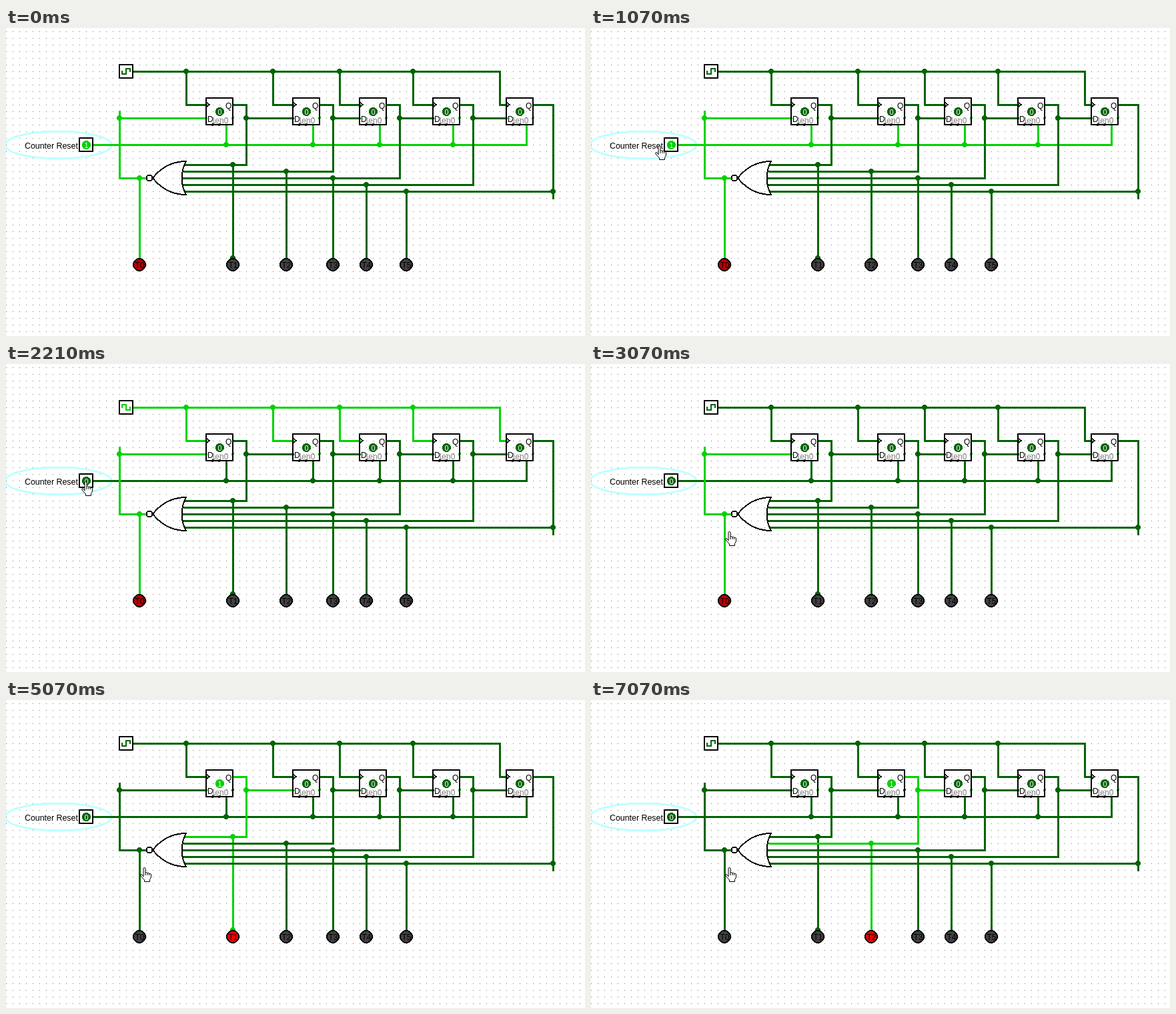
Animation of 868x462 px, one loop 8000 ms. Source, as an HTML page:

```html
<!DOCTYPE html>
<html lang="en">
<head>
<meta charset="utf-8">
<title>Ring counter</title>
<style>
  html, body { margin: 0; width: 100%; height: 100%; overflow: hidden; background: #fff; }
  svg { display: block; }
  text { font: 12px "Liberation Sans", Arial, sans-serif; }
</style>
</head>
<body>
<svg id="stage" width="868" height="462" viewBox="0 0 868 462" shape-rendering="crispEdges"></svg>
<script>
const LOOP = 8000, STEP = 70;
const ON = '#00d200', OFF = '#006400';
const stage = document.getElementById('stage');

function add(tag, attrs, parent = stage, content) {
  const el = document.createElementNS('http://www.w3.org/2000/svg', tag);
  for (const key in attrs) el.setAttribute(key, attrs[key]);
  if (content !== undefined) el.textContent = content;
  parent.append(el);
  return el;
}
const label = (x, y, content, attrs = {}) => add('text', { x, y, ...attrs }, stage, content);
const outline = (tag, attrs) => add(tag, { fill: 'none', stroke: '#000', 'stroke-width': 2, ...attrs });
const level = on => on ? ON : OFF;

// Wires and their junctions share one colour per net.
function net(d, junctions) {
  const g = add('g', {});
  add('path', { d, fill: 'none', stroke: 'currentColor', 'stroke-width': 3,
    'stroke-linecap': 'square', transform: 'translate(.5 .5)' }, g);
  for (const [cx, cy] of junctions) add('circle', { cx, cy, r: 4, fill: 'currentColor' }, g);
  return g;
}

function valueDot(cx, cy) {
  const dot = add('circle', { cx, cy, r: 6.5 });
  const digit = label(cx, cy + 4, '0', { fill: '#fff', 'text-anchor': 'middle', 'font-weight': 'bold' });
  digit.style.fontSize = '11px';
  return on => {
    dot.setAttribute('fill', level(on));
    digit.textContent = on ? '1' : '0';
  };
}

// Background grid
const pattern = add('pattern', { id: 'grid', width: 10, height: 10, patternUnits: 'userSpaceOnUse' }, add('defs', {}));
add('rect', { x: 0, y: 5, width: 1, height: 1, fill: '#777' }, pattern);
add('rect', { width: 868, height: 462, fill: 'url(#grid)' });
outline('ellipse', { cx: 78.5, cy: 175.5, rx: 79.5, ry: 20.5, stroke: '#c0ffff', 'stroke-width': 3 });

// Wiring
const flops = [300, 430, 530, 640, 750];
const taps = [340, 420, 490, 540, 600];
const drops = [270, 400, 500, 610];

const clockNet = net('M190 65H740V115H750' + drops.map((x, i) => `M${x} 65V115H${flops[i]}`).join(''),
  drops.map(x => [x, 65]));
const resetNet = net('M130 175H780V145' + flops.slice(0, 4).map(x => `M${x + 30} 175V145`).join(''),
  flops.slice(0, 4).map(x => [x + 30, 175]));
const norNet = net('M170 125V225H210M170 135H300M200 225V345', [[170, 135], [200, 225]]);

const outNets = flops.map((x, i) => {
  const y = 205 + 10 * i, last = i === 4;
  const bus = x + (last ? 70 : 60);
  const gateX = 266 + 4 * ((y - 225) / 25) ** 2;
  const joints = [[bus, last ? y : 135], [taps[i], y]];
  if (i === 0) joints.push([taps[0], 345]);
  const branch = last ? `M${bus} ${y}V255` : `M${bus} 135H${flops[i + 1]}`;
  return net(`M${x + 40} 115H${bus}V${y}H${gateX}${branch}M${taps[i]} ${y}V345`, joints);
});

// Clock source, reset pin and gate
outline('rect', { x: 170, y: 55, width: 20, height: 20 });
const wave = outline('path', {});
label(28, 181, 'Counter Reset').style.fontSize = '12.4px';
outline('rect', { x: 110, y: 165, width: 20, height: 20 });
const setPin = valueDot(120.5, 175.5);
outline('path', { d: 'M220 225Q240 200 270 200Q257 225 270 250Q240 250 220 225Z' });
outline('circle', { cx: 215, cy: 225, r: 4.5 });

// Flip-flops
const setFlop = flops.map(x => {
  for (const dx of [10, 20]) add('circle', { cx: x + dx, cy: 145, r: 2, fill: '#2828ff' });
  const inverse = add('circle', { cx: x + 40, cy: 135, r: 2 });
  outline('rect', { x, y: 105, width: 40, height: 40 });
  outline('path', { d: `M${x} 111l5 4l-5 4`, 'stroke-width': 1.5 });
  label(x + 2, 141, 'D');
  label(x + 29, 121, 'Q');
  [['1', 11], ['en', 20], ['0', 30]].forEach(([name, dx]) =>
    label(x + dx, 143, name, { fill: '#808080', 'text-anchor': 'middle' }));
  const setDot = valueDot(x + 20.5, 125.5);
  return on => {
    setDot(on);
    inverse.setAttribute('fill', level(!on));
  };
});

// Lamps
const lamps = [200, ...taps].map((cx, i) => {
  const lamp = outline('circle', { cx, cy: 355, r: 9 });
  label(cx + .5, 360, 'T' + i, { 'text-anchor': 'middle' });
  return on => lamp.setAttribute('fill', on ? (i ? '#f00000' : '#b80000') : '#404040');
});

// Hand pointer
const hand = add('g', { 'shape-rendering': 'auto' });
add('path', { d: 'M5 14V2Q5 .5 6.5 .5T8 2V8Q9.5 6.8 11 8.5Q12.7 7.6 13.7 9.3Q16.5 8.6 16.5 11V15L14.5 18.5V21.5H6.5V19L1 13Q0 10.5 2.5 10.5Z',
  fill: '#fff', stroke: '#000' }, hand);
add('path', { d: 'M8 8V12M11 8.5V12M13.7 9.3V12', fill: 'none', stroke: '#000' }, hand);

// [start, end, from, to]: position advances once per STEP
const moves = [
  [310, 870, [740, 438], [87, 184], p => 1 - (1 - p) ** 1.5],
  [1010, 1070, [91, 180], [96, 176]],
  [1070, 1280, [96, 176], [109, 176]],
  [1680, 1680, [113, 176], [113, 176]],
  [2600, 2740, [142, 201], [201, 251]]
];

function pointerAt(t) {
  const move = moves.filter(m => t >= m[0]).pop();
  if (!move) return null;
  const [start, end, from, to, ease = p => p] = move;
  const elapsed = Math.floor((t - start) / STEP) * STEP;
  const p = end > start ? ease(Math.min(1, elapsed / (end - start))) : 1;
  return from.map((v, i) => Math.round(v + (to[i] - v) * p));
}

function render(t) {
  const toggles = [70, 1070, 2080, 3070, 4080, 5070, 6060, 7070];
  const clock = toggles.filter(at => t >= at).length % 2 === 1;
  const reset = t < 2140;
  const active = t < 4080 ? 0 : t < 6060 ? 1 : 2;

  clockNet.style.color = level(clock);
  wave.setAttribute('stroke', level(clock));
  wave.setAttribute('d', clock ? 'M174 66V61H180V69H186V64' : 'M174 64V69H180V61H186V66');
  resetNet.style.color = level(reset);
  setPin(reset);
  norNet.style.color = level(active === 0);
  outNets.forEach((wire, i) => {
    wire.style.color = level(active === i + 1);
    setFlop[i](active === i + 1);
  });
  lamps.forEach((set, i) => set(active === i));

  const pos = pointerAt(t);
  hand.setAttribute('visibility', pos ? 'visible' : 'hidden');
  if (pos) hand.setAttribute('transform', `translate(${pos})`);
}

const began = performance.now();
function tick() {
  render((performance.now() - began) % LOOP);
  requestAnimationFrame(tick);
}
tick();
</script>
</body>
</html>
```
